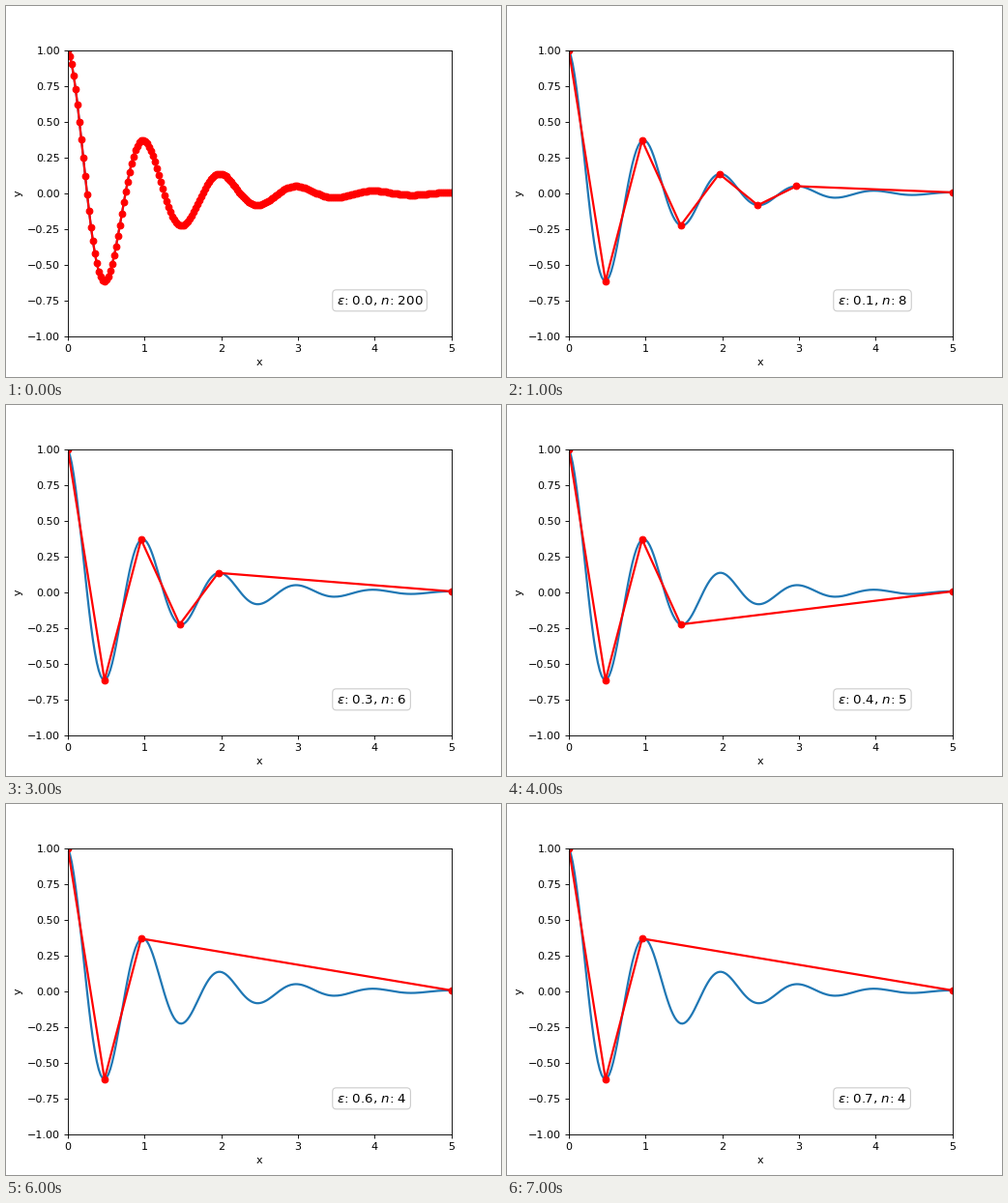
Write a matplotlib script that moves like this. It is 512x384 px and loops after 8000 ms.

```python
import numpy as np
import matplotlib.pyplot as plt
from matplotlib.animation import FuncAnimation


def simplify(pts, eps):
    """Ramer-Douglas-Peucker polyline simplification."""
    if len(pts) < 3:
        return pts
    a, b = pts[0], pts[-1]
    dx, dy = b - a
    rel = pts - a
    dist = np.abs(dx * rel[:, 1] - dy * rel[:, 0]) / np.hypot(dx, dy)
    k = 1 + int(np.argmax(dist[1:-1]))
    if dist[k] <= eps:
        return np.array([a, b])
    left = simplify(pts[:k + 1], eps)
    return np.vstack([left[:-1], simplify(pts[k:], eps)])


x = np.linspace(0, 5, 200)
y = np.exp(-x) * np.cos(2 * np.pi * x)
curve = np.column_stack([x, y])

fig, ax = plt.subplots(figsize=(6.4, 4.8), dpi=80)
ax.plot(x, y, lw=2)
line, = ax.plot([], [], "ro-", lw=2)
label = ax.text(3.5, -0.75, "", fontsize=12, va="center",
                bbox=dict(boxstyle="round", fc="white", ec="0.8", lw=1))
ax.set(xlim=(0, 5), ylim=(-1, 1), xlabel="x", ylabel="y")


def update(i):
    eps = i / 10
    pts = simplify(curve, eps)
    line.set_data(pts[:, 0], pts[:, 1])
    label.set_text(rf"$\varepsilon$: {eps:.1f}, $n$: {len(pts)}")
    return line, label


anim = FuncAnimation(fig, update, frames=8, interval=1000,
                     repeat=True, repeat_delay=0)
plt.show()
```
